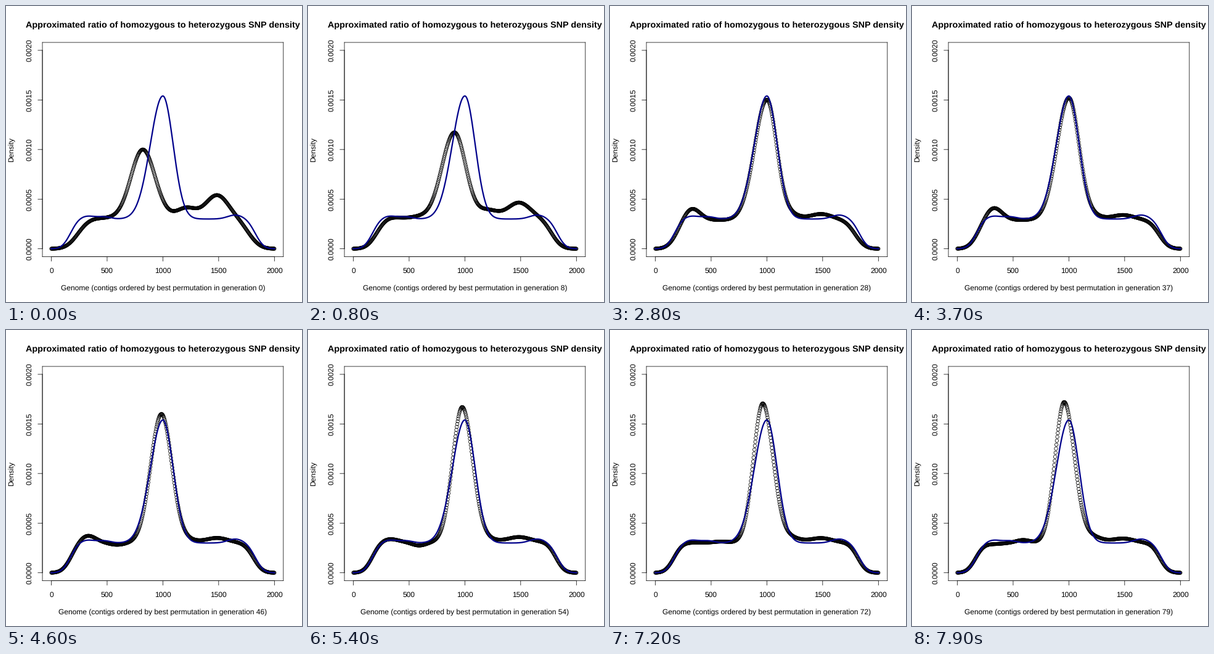
Recreate the animation shown at these times as a matplotlib script. Size 480x480 px, loop 8000 ms.

```python
import numpy as np
import matplotlib.pyplot as plt
from matplotlib.animation import FuncAnimation

SIZE, DPI = 480, 72            # at 72 dpi one point is one pixel
FRAMES, INTERVAL = 80, 100
LEFT, RIGHT, TOP, BOTTOM = 59.04, 449.76, 59.04, 406.56
HAIR = 0.75

plt.rcParams["font.family"] = "Liberation Sans"
plt.rcParams["text.hinting"] = "none"

GRID = np.linspace(0, 2000, 512)


def bump(height, centre, left, right=None):
    """Bell curve, with its own width on each side if given."""
    width = np.where(GRID < centre, left, right or left)
    return height * np.exp(-((GRID - centre) / width) ** 2 / 2)


def rise(z):
    """Close approximation of the normal cumulative curve."""
    return 1 / (1 + np.exp(-1.6 * z - 0.07 * z ** 3))


def density(floor, start, end, soft, peak, centre, left, right,
            early, dip, shoulder, late):
    """Soft-edged plateau, a main peak and four side bumps, in 1e-5."""
    plateau = floor * rise((GRID - start) / soft) * rise((end - GRID) / soft)
    side = (bump(early, 325, 75) + bump(dip, 590, 65)
            + bump(shoulder, 1210, 85) + bump(late, 1485, 100))
    return 1e-5 * (plateau + bump(peak, centre, left, right) + side)


# Shape of the best permutation at a few generations; blended in between.
STAGES = {
    0: (31, 240, 1770, 84, 69, 820, 106, 110, 0, 0, 10, 23),
    16: (31, 178, 1785, 62, 103.5, 993, 117, 92, 2, 2.5, 5, 8),
    28: (29, 193, 1792, 72, 121, 1000, 111, 88, 12, 0, 5, 6),
    37: (29, 182, 1808, 70, 123, 1000, 108, 91, 12.5, 0, 4, 5),
    54: (31, 170, 1815, 62, 136, 976, 86, 94, 3, -3.5, 2, 5),
    79: (30, 165, 1815, 62, 142, 958, 82, 92, -1, 3, 6, 4.5),
}


def best(gen):
    return density(*(np.interp(gen, list(STAGES), values)
                     for values in zip(*STAGES.values())))


expected = (density(30, 170, 1830, 60, 124, 1000, 113, 92, 3, 0, 0, 0)
            + 1e-5 * (bump(2, 480, 55) + bump(4, 1650, 70)))

fig = plt.figure(figsize=(SIZE / DPI, SIZE / DPI), dpi=DPI, facecolor="white")
ax = fig.add_axes([LEFT / SIZE, 1 - BOTTOM / SIZE,
                   (RIGHT - LEFT) / SIZE, (BOTTOM - TOP) / SIZE])
ax.set(xlim=(-80, 2080), ylim=(-8e-5, 208e-5), xticks=[], yticks=[])
for spine in ax.spines.values():
    spine.set(linewidth=HAIR, snap=False)


def label(x, y, text, size=12, **style):
    """Text centred on x (or y when rotated), baseline at the other."""
    return fig.text(x / SIZE, 1 - y / SIZE, text, size=size, ha="center",
                    va="baseline", rotation_mode="anchor", **style)


def stroke(xs, ys):
    """Thin axis line in pixels, measured from the top left."""
    fig.add_artist(plt.Line2D(np.array(xs) / SIZE, 1 - np.array(ys) / SIZE,
                              color="black", lw=HAIR, snap=False))


MID_X, MID_Y = (LEFT + RIGHT) / 2, (TOP + BOTTOM) / 2
label(MID_X, 34.8, "Approximated ratio of homozygous to heterozygous SNP density",
      size=14.4, weight="bold")
label(12.96, MID_Y, "Density", rotation=90)
caption = label(MID_X, 461.7, "")

tick_x = LEFT + (80 + 500 * np.arange(5)) / 2160 * (RIGHT - LEFT)
tick_y = BOTTOM - (8 + 50 * np.arange(5)) / 216 * (BOTTOM - TOP)
stroke(tick_x[[0, -1]], [BOTTOM, BOTTOM])
stroke([LEFT, LEFT], tick_y[[0, -1]])
for i, (x, y) in enumerate(zip(tick_x, tick_y)):
    stroke([x, x], [BOTTOM, BOTTOM + 7.2])
    stroke([LEFT - 7.2, LEFT], [y, y])
    label(x, 432.7, str(500 * i))
    label(41.76, y, f"{5e-4 * i:.4f}", rotation=90)

dots = ax.scatter(GRID, best(0), s=5.4 ** 2, facecolors="none",
                  edgecolors="black", linewidths=HAIR, zorder=2)
ax.plot(GRID, expected, color="#00008b", lw=2.25, zorder=3)


def update(gen):
    dots.set_offsets(np.column_stack([GRID, best(gen)]))
    caption.set_text(f"Genome (contigs ordered by best permutation in generation {gen})")
    return dots, caption


anim = FuncAnimation(fig, update, frames=FRAMES, interval=INTERVAL,
                     repeat=True, repeat_delay=0, blit=False)
plt.show()
```
